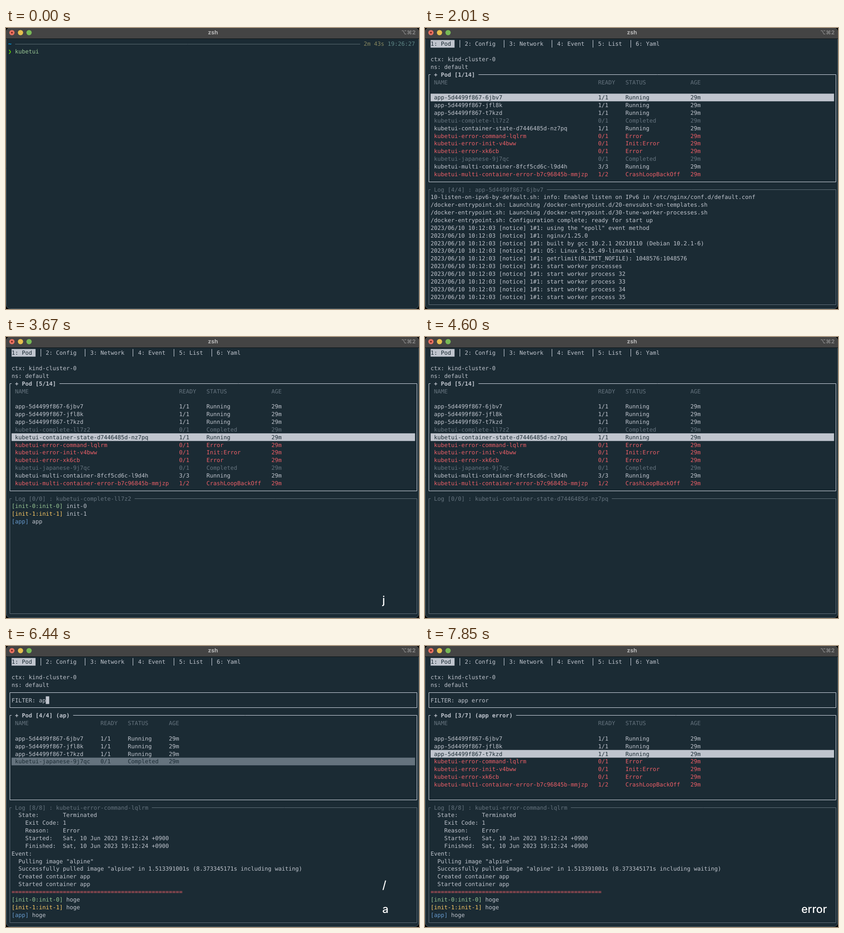
An HTML page with a canvas for the animation above (8000 ms loop, 906 by 618 pixels).

```html
<!DOCTYPE html>
<html lang="en">
<head>
<meta charset="utf-8">
<title>kubetui</title>
<style>
  html, body { margin: 0; width: 100%; height: 100%; overflow: hidden; background: #000; }
  canvas { display: block; }
</style>
</head>
<body>
<canvas id="stage" width="906" height="618"></canvas>
<script>
const ctx = document.getElementById('stage').getContext('2d');
const LOOP = 8000, CELL_W = 7.5, CELL_H = 16.86;
const BG = '#1b2b34', FG = '#c0c5ce', BRIGHT = '#d8dee9', DIM = '#65737e';
const RED = '#ec5f67', GREEN = '#99c794', YELLOW = '#fac863', BLUE = '#6699cc';
const MONO = '12.458px "DejaVu Sans Mono", monospace';

const pods = [
  ['app-5d4499f867-6jbv7', '1/1', 'Running'],
  ['app-5d4499f867-jfl8k', '1/1', 'Running'],
  ['app-5d4499f867-t7kzd', '1/1', 'Running'],
  ['kubetui-complete-ll7z2', '0/1', 'Completed'],
  ['kubetui-container-state-d7446485d-nz7pq', '1/1', 'Running'],
  ['kubetui-error-command-lqlrm', '0/1', 'Error'],
  ['kubetui-error-init-v4bww', '0/1', 'Init:Error'],
  ['kubetui-error-xk6cb', '0/1', 'Error'],
  ['kubetui-japanese-9j7qc', '0/1', 'Completed'],
  ['kubetui-multi-container-8fcf5cd6c-l9d4h', '3/3', 'Running'],
  ['kubetui-multi-container-error-b7c96845b-mmjzp', '1/2', 'CrashLoopBackOff'],
  ['kubetui-running-7c9d8b6f5-k2x8m', '1/1', 'Running'],
  ['kubetui-running-7c9d8b6f5-p4w9z', '1/1', 'Running'],
  ['kubetui-running-7c9d8b6f5-s6v2h', '1/1', 'Running'],
].map(pod => [...pod, '29m']);

const notice = s => '2023/06/10 10:12:03 [notice] 1#1: ' + s;
const launch = s => '/docker-entrypoint.sh: Launching /docker-entrypoint.d/' + s;
const nginxLog = [
  '10-listen-on-ipv6-by-default.sh: info: Enabled listen on IPv6 in /etc/nginx/conf.d/default.conf',
  launch('20-envsubst-on-templates.sh'),
  launch('30-tune-worker-processes.sh'),
  '/docker-entrypoint.sh: Configuration complete; ready for start up',
  ...['using the "epoll" event method', 'nginx/1.25.0',
    'built by gcc 10.2.1 20210110 (Debian 10.2.1-6)', 'OS: Linux 5.15.49-linuxkit',
    'getrlimit(RLIMIT_NOFILE): 1048576:1048576', 'start worker processes',
    ...[32, 33, 34, 35].map(n => 'start worker process ' + n)].map(notice),
];
const completeLog = ['[init-0:init-0] init-0', '[init-1:init-1] init-1', '[app] app'];
const errorLog = [
  '  State:       Terminated',
  '    Exit Code: 1',
  '    Reason:    Error',
  '    Started:   Sat, 10 Jun 2023 19:12:24 +0900',
  '    Finished:  Sat, 10 Jun 2023 19:12:24 +0900',
  'Event:',
  '  Pulling image "alpine"',
  '  Successfully pulled image "alpine" in 1.513391001s (8.373345171s including waiting)',
  '  Created container app',
  '  Started container app',
  '='.repeat(50),
  '[init-0:init-0] hoge', '[init-1:init-1] hoge', '[app] hoge',
];
const prefixColors = { '[init-0:init-0]': GREEN, '[init-1:init-1]': YELLOW, '[app]': BLUE };

// Timelines: [start ms, value]
const selections = [[0, 0], [2250, 1], [2310, 2], [2370, 3], [3610, 4], [4900, 5], [6440, 3], [6500, 2]];
const queries = [[0, ''], [6390, 'a'], [6440, 'ap'], [6500, 'app'], [7090, 'app '], [7330, 'app e'],
  [7400, 'app er'], [7470, 'app err'], [7540, 'app erro'], [7610, 'app error']];
const logs = [
  [0, { title: '[0/0]', lines: [] }],
  [1300, { title: '[0/0] : ' + pods[0][0], lines: [] }],
  [1360, { title: '[4/4] : ' + pods[0][0], lines: nginxLog }],
  [2780, { title: '[0/0] : ' + pods[3][0], lines: [] }],
  [2840, { title: '[0/0] : ' + pods[3][0], lines: completeLog }],
  [3960, { title: '[0/0] : ' + pods[4][0], lines: [] }],
  [5260, { title: '[8/8] : ' + pods[5][0], lines: errorLog }],
];
const cursorOn = [[120, 360], [5970, 6210], [6390, 6790], [7030, 7850]];
// Key overlays: [start, end, keys, ms between keys]
const overlays = [
  [540, 1300, 'enter'], [1250, 2010, 'enter'], [2250, 3140, 'jjj', 60], [2720, 3490, 'enter'],
  [3610, 4380, 'j'], [3850, 4600, 'enter'], [4900, 5680, 'j'], [5200, 5970, 'enter'],
  [5970, 6740, '/'], [6390, 7270, 'app', 55], [7090, 7850, 'space'], [7330, 8400, 'error', 70],
];

const at = (timeline, t) => timeline.filter(([start]) => start <= t).pop()[1];
const colX = c => 4.8 + c * CELL_W;
const midX = c => colX(c) + CELL_W / 2;
const rowY = r => 34.8 + r * CELL_H;

function text(s, col, row, color = FG, bold = false) {
  ctx.font = (bold ? 'bold ' : '') + MONO;
  ctx.fillStyle = color;
  [...s].forEach((ch, i) => ch !== ' ' && ctx.fillText(ch, colX(col + i), rowY(row) + 4.4));
}

function cells(col, row, count, color) {
  ctx.fillStyle = color;
  ctx.fillRect(colX(col), rowY(row) - CELL_H / 2, count * CELL_W, CELL_H);
}

function line(color, width, ...points) {
  ctx.strokeStyle = color;
  ctx.lineWidth = width;
  ctx.beginPath();
  points.forEach(([x, y]) => ctx.lineTo(x, y));
  ctx.stroke();
}

function panel(top, bottom, color, title = '', bold = false) {
  const snap = v => Math.floor(v) + 0.5;
  const [left, right, y0, y1] = [midX(0), midX(119), rowY(top), rowY(bottom)].map(snap);
  const gapEnd = title ? colX(title.length + 3) : left;
  line(color, 1, [gapEnd, y0], [right, y0], [right, y1], [left, y1], [left, y0], [title ? colX(1) : gapEnd, y0]);
  text(title, 2, top, bold ? FG : color, bold);
}

function drawWindow() {
  ctx.fillStyle = '#000';
  ctx.fillRect(0, 0, 906, 618);
  ctx.beginPath();
  ctx.roundRect(0.5, -0.5, 905, 618, 9);
  ctx.fillStyle = BG;
  ctx.fill();
  ctx.strokeStyle = '#53636a';
  ctx.lineWidth = 1;
  ctx.stroke();

  ctx.beginPath();
  ctx.roundRect(0, 0, 906, 23, [8, 8, 0, 0]);
  ctx.fillStyle = '#444444';
  ctx.fill();
  ctx.fillStyle = '#0d1518';
  ctx.fillRect(0, 23, 906, 1);
  ['#e5705f', '#e6bf4e', '#77b956'].forEach((color, i) => disc(13 + i * 18.8, 5.8, color));
  disc(13, 1.8, '#6f1d17');
  ctx.font = 'bold 12.5px Inter, sans-serif';
  ctx.fillStyle = '#b8b8b8';
  ctx.textAlign = 'center';
  ctx.fillText('zsh', 454, 14);
  ctx.font = 'bold 12px Inter, "DejaVu Sans", sans-serif';
  ctx.fillStyle = '#868686';
  ctx.textAlign = 'right';
  ctx.fillText('⌥⌘2', 898.5, 13.5);
  ctx.textAlign = 'left';
}

function disc(x, r, color) {
  ctx.fillStyle = color;
  ctx.beginPath();
  ctx.arc(x, 10.2, r, 0, 7);
  ctx.fill();
}

function drawPrompt() {
  text('~', 0, 0, '#00afff', true);
  line('#5d6e75', 1, [20, 35.5], [777, 35.5]);
  text('2m 43s', 104, 0, '#87875f');
  text('19:26:27', 111, 0, '#5f8787');
  text('❯', 0, 1, '#5fd700');
  text('kubetui', 2, 1, GREEN);
}

function drawTabs() {
  let col = 1;
  ['1: Pod', '2: Config', '3: Network', '4: Event', '5: List', '6: Yaml'].forEach((tab, i, tabs) => {
    if (i === 0) cells(col, 0, 7, FG);
    text(tab, col, 0, i === 0 ? BG : FG);
    col += tab.length + 4;
    const x = Math.floor(midX(col - 2)) + 0.5;
    if (i < tabs.length - 1) line(BRIGHT, 1, [x, 26.5], [x, 43]);
  });
  text('ctx: kind-cluster-0', 1, 2);
  text('ns: default', 1, 3);
}

function podColor(status) {
  if (status === 'Running') return FG;
  return status === 'Completed' ? DIM : RED;
}

function drawPods(t, query, filtering) {
  const words = query.split(' ');
  const list = t < 650 ? [] : pods.filter(([name]) => words.some(word => name.includes(word)));
  const selected = at(selections, t);
  const top = filtering ? 7 : 4;
  const position = list.length ? selected + 1 : 0;
  panel(top, 18, BRIGHT, `+ Pod [${position}/${list.length}]` + (query && ` (${query})`), true);
  if (!list.length) return;

  const header = ['NAME', 'READY', 'STATUS', 'AGE'];
  const columns = [2];
  header.forEach((label, i) => {
    const width = Math.max(label.length, ...list.map(pod => pod[i].length));
    columns.push(columns[i] + width + 3);
  });
  header.forEach((label, i) => text(label, columns[i], top + 1, DIM));
  list.slice(0, 15 - top).forEach((pod, i) => {
    const row = top + 3 + i, color = podColor(pod[2]);
    if (i === selected) cells(1, row, 118, color);
    pod.forEach((value, c) => text(value, columns[c], row, i === selected ? BG : color));
  });
}

function drawLog({ title, lines }) {
  panel(19, 34, DIM, 'Log ' + title);
  lines.forEach((s, i) => {
    const prefix = s.split(' ')[0], color = prefixColors[prefix];
    text(s, 1, 20 + i, s[0] === '=' ? RED : FG);
    if (color) {
      cells(1, 20 + i, prefix.length, BG);
      text(prefix, 1, 20 + i, color);
    }
  });
}

function drawCursor(t, query) {
  if (!cursorOn.some(([from, to]) => t >= from && t < to)) return;
  if (t < 540) cells(9, 1, 1, FG);
  else cells(9 + query.length, 5, 1, FG);
}

function drawReturnKey(y) {
  ctx.strokeStyle = ctx.fillStyle = '#fff';
  ctx.lineWidth = 2.5;
  ctx.beginPath();
  ctx.moveTo(836, y + 577.5);
  ctx.lineTo(845, y + 577.5);
  ctx.arc(845, y + 572, 5.5, Math.PI / 2, -Math.PI / 2, true);
  ctx.lineTo(843, y + 566.5);
  ctx.stroke();
  ctx.beginPath();
  ctx.moveTo(828.3, y + 577.5);
  ctx.lineTo(836.5, y + 571.8);
  ctx.lineTo(836.5, y + 583.2);
  ctx.fill();
}

function drawOverlays(t) {
  const started = overlays.filter(([start]) => start <= t);
  started.forEach(([start, end, keys, gap], i) => {
    if (t >= end) return;
    const y = -53 * (started.length - 1 - i);
    if (keys === 'enter') drawReturnKey(y);
    else if (keys === 'space') line('#fff', 2, [829, y + 580], [829, y + 586], [845, y + 586], [845, y + 580]);
    else {
      const count = gap ? Math.floor((t - start) / gap) + 1 : 1;
      ctx.font = '500 24px Inter, sans-serif';
      ctx.fillStyle = '#fff';
      ctx.fillText(keys.slice(0, count), 825.5, y + 586.8);
    }
  });
}

function draw(t) {
  const query = at(queries, t), filtering = t >= 5970;
  drawWindow();
  if (t < 540) drawPrompt();
  else {
    drawTabs();
    if (filtering) {
      panel(4, 6, BRIGHT);
      text('FILTER: ' + query, 1, 5);
    }
    drawPods(t, query, filtering);
    drawLog(at(logs, t));
  }
  drawCursor(t, query);
  drawOverlays(t);
}

ctx.textRendering = 'geometricPrecision';
const begin = performance.now();
(function tick() {
  draw((performance.now() - begin) % LOOP);
  requestAnimationFrame(tick);
})();
</script>
</body>
</html>
```
